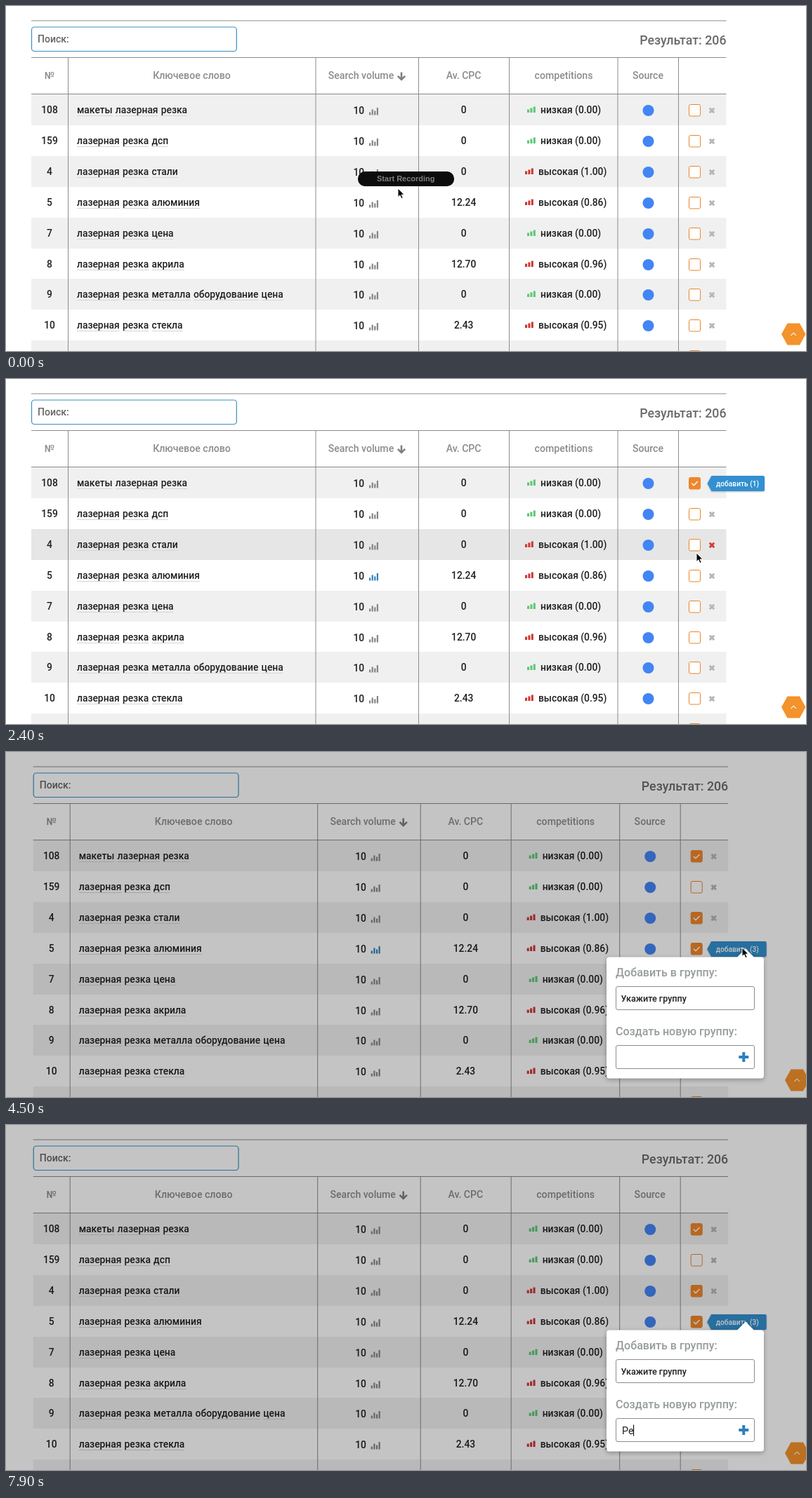
An HTML page that plays this animation: 1139x492 px, repeating every 8 s.

```html
<!DOCTYPE html>
<html lang="ru">
<head>
<meta charset="utf-8">
<title>Ключевые слова</title>
<style>
  html, body { margin: 0; width: 100%; height: 100%; overflow: hidden; background: #fff; }
  svg { display: block; width: 1139px; height: 492px; }
  text { font: 500 13.8px Roboto, "Open Sans", sans-serif; fill: #1f1f1f; white-space: pre; }
  text.head { font-size: 14.1px; fill: #8c8c8c; }
  text.search { font-size: 14px; fill: #666; }
  text.total { font-size: 17.8px; fill: #6a6a6a; }
  text.label { font-size: 16px; fill: #979c9c; }
  text.small { font-size: 12.6px; }
  text.tag { font-size: 10.2px; fill: #fff; }
  text.typed { font-size: 14.3px; font-weight: 400; }
  text.pill { font: bold 11px "Liberation Sans", Arial, sans-serif; fill: #808080; }
  .line { stroke: #8c8c8c; }
  .box { fill: #fff; stroke: #8c8c8c; }
  .check rect { fill: #fff; stroke: #e8862c; }
  .check path { fill: none; stroke: #fff; stroke-width: 1.5; visibility: hidden; }
  .check.on rect { fill: #f0862a; }
  .check.on path { visibility: visible; }
  .cross { fill: none; stroke: #b6b6b6; stroke-width: 3; }
  .hover .cross { stroke: #d63a3a; }
  .hover .bg { fill: #e6e6e6; }
  .bars { fill: #858585; }
  .bars.blue { fill: #2e83b8; }
  #tag { filter: drop-shadow(0 1px 1px rgba(0,0,0,.25)); }
  #popup { filter: drop-shadow(0 2px 3px rgba(0,0,0,.3)); }
</style>
</head>
<body>
<svg viewBox="0 0 1139 492">
  <g id="page">
    <path class="line" d="M36 21H1025.5"/>
    <rect x="36.5" y="30" width="291.8" height="34.5" rx="4" fill="#fff" stroke="#3a8fc4" stroke-width="1.2"/>
    <text class="search" x="45" y="51.5">Поиск:</text>
    <text class="total" x="1025.5" y="54.5" text-anchor="end">Результат: 206</text>
    <g id="rows"></g>
    <g id="grid"></g>
    <path d="M563 94.5V105M557.8 99.8L563 105L568.2 99.8" fill="none" stroke="#808080" stroke-width="2.6"/>
    <g id="tag">
      <path fill="#3390d0"/>
      <text class="tag" y="14.5"></text>
    </g>
  </g>
  <g id="toTop">
    <path d="M1104 468L1112.5 452.5H1130L1138.5 468L1130 483.5H1112.5Z" fill="#f4922b"/>
    <path d="M1117.5 469.8L1121.3 466.2L1125 469.8" fill="none" stroke="#fff" stroke-width="1.1"/>
  </g>
  <rect id="shade" width="1139" height="492"/>
  <g id="popup">
    <path d="M859 292.5H1041L1053 280.5L1065 292.5H1075Q1079 292.5 1079 296.5V461.5Q1079 465.5 1075 465.5H859Q855 465.5 855 461.5V296.5Q855 292.5 859 292.5Z" fill="#fff"/>
    <text class="label" x="868" y="320">Добавить в группу:</text>
    <rect class="box" x="868.5" y="334.5" width="197" height="33" rx="2.5"/>
    <text class="small" x="875.5" y="355.5">Укажите группу</text>
    <text class="label" x="868" y="404">Создать новую группу:</text>
    <rect class="box" x="868.5" y="418.5" width="197" height="33" rx="2.5"/>
    <path d="M1050.3 428V442M1043.3 435H1057.3" stroke="#2b80bd" stroke-width="4"/>
    <text id="typed" class="typed" x="877" y="440.5"></text>
    <path id="caret" d="M0 427.5V443.5" stroke="#111" stroke-width="1.2"/>
  </g>
  <g id="pill">
    <rect x="501" y="236" width="137" height="21" rx="10" fill="#0c0c0c"/>
    <text class="pill" x="569.3" y="249.8" text-anchor="middle">Start Recording</text>
  </g>
  <g id="cursor">
    <circle id="ring" r="25" fill="none" stroke="#0b0b0b" stroke-width="2.5"/>
    <path id="arrow" d="M0 0V12.5L2.9 9.9L5 14.6L7.2 13.6L5.1 9.1H9Z" fill="#000" stroke="#fff"/>
    <g id="hand" fill="#fff" stroke="#000" stroke-width="1.1" stroke-linejoin="round">
      <path d="M-1.3 8V1.2Q0 -.8 1.3 1.2V5.5Q2.8 4.3 3.9 5.8Q5.4 4.8 6.4 6.4Q8.3 5.8 8.7 7.8V11L7.3 15H.2L-3.8 9.8Q-5 7.7 -3.3 7.2Z"/>
      <path d="M1.8 9.5V12.5M4 9.5V12.5M6.2 9.5V12.5" stroke-width=".8"/>
    </g>
    <path id="beam" d="M-3 -6.5Q0 -6.5 0 -4.5Q0 -6.5 3 -6.5M0 -4.5V5M-3 7Q0 7 0 5Q0 7 3 7M-1.5 2.5H1.5" fill="none" stroke="#111" stroke-width="1.2"/>
  </g>
</svg>
<script>
const LOOP = 8000, STEP = 100, OPEN = 4200, TYPE = 7400;
const $ = id => document.getElementById(id);

function add(parent, tag, attrs, text) {
  const el = document.createElementNS('http://www.w3.org/2000/svg', tag);
  for (const k in attrs) el.setAttribute(k, attrs[k]);
  if (text !== undefined) el.textContent = text;
  return parent.appendChild(el);
}
const show = (el, on) => { el.style.display = on ? '' : 'none'; };
const clamp = v => Math.min(1, Math.max(0, v));
const rowTop = i => Math.round(126 + i * 43.9);

// number, keyword, CPC, competition
const data = [
  [108, 'макеты лазерная резка', '0', 0],
  [159, 'лазерная резка дсп', '0', 0],
  [4, 'лазерная резка стали', '0', 1],
  [5, 'лазерная резка алюминия', '12.24', .86],
  [7, 'лазерная резка цена', '0', 0],
  [8, 'лазерная резка акрила', '12.70', .96],
  [9, 'лазерная резка металла оборудование цена', '0', 0],
  [10, 'лазерная резка стекла', '2.43', .95],
  null
];

function bars(parent, x, base, width, gap, heights, attrs) {
  const d = heights.map((h, i) => `M${x + i * gap} ${base}v${-h}h${width}v${h}z`).join('');
  return add(parent, 'path', { d, ...attrs });
}

function keyword(g, phrase) {
  let x = 101;
  for (const word of phrase.split(' ')) {
    const w = add(g, 'text', { x, y: 26.5 }, word).getComputedTextLength();
    add(g, 'path', { d: `M${x} 30.5h${w}`, stroke: '#d6d6d6' });
    x += w + 4.2;
  }
}

const rows = data.map((item, i) => {
  const g = add($('rows'), 'g', { transform: `translate(0 ${rowTop(i)})` });
  add(g, 'rect', { class: 'bg', x: 36, width: 989.5, height: rowTop(i + 1) - rowTop(i), fill: i % 2 ? '#fff' : '#f0f0f0' });
  const check = add(g, 'g', { class: 'check' });
  add(check, 'rect', { x: 972.5, y: 14.5, width: 16, height: 16.5, rx: 2 });
  add(check, 'path', { d: 'M976.3 22.8L979.3 25.8L984.8 20' });
  const row = { g, check };
  if (!item) return row;

  const [num, phrase, cpc, level] = item;
  add(g, 'text', { x: 62, y: 26.5, 'text-anchor': 'middle' }, num);
  keyword(g, phrase);
  add(g, 'text', { x: 494.5, y: 27.5 }, '10');
  row.icon = bars(g, 517, 29.5, 2.2, 3.6, [4, 8, 6, 10.5], { class: 'bars' });
  add(g, 'text', { x: 651.7, y: 26.5, 'text-anchor': 'middle' }, cpc);
  const x = level ? 739 : 742;
  bars(g, x, 26, 3, 4.4, [4.5, 6.5, 8.5], { fill: level ? '#cf3434' : '#5cc872' });
  add(g, 'text', { x: x + 19, y: 26.5 }, `${level ? 'высокая' : 'низкая'} (${level.toFixed(2)})`);
  add(g, 'circle', { cx: 914.5, cy: 23, r: 8, fill: '#4285f4' });
  row.cross = add(g, 'path', { class: 'cross', d: 'M1001.8 19.8L1008.2 26.2M1008.2 19.8L1001.8 26.2' });
  return row;
});

for (const y of [73.5, 125.5]) add($('grid'), 'path', { class: 'line', d: `M36 ${y}H1025.5` });
for (const x of [88.5, 441, 587.5, 716.5, 871, 957.5]) add($('grid'), 'path', { class: 'line', d: `M${x} 73V492` });
[['№', 62], ['Ключевое слово', 264.5], ['Search volume', 505.5], ['Av. CPC', 651.7], ['competitions', 794], ['Source', 914]]
  .forEach(([s, x]) => add($('grid'), 'text', { class: 'head', x, y: 104, 'text-anchor': 'middle' }, s));

// time, x, y
const path = [
  [300, 558, 260], [1100, 981, 147], [1800, 981, 147], [2400, 983, 248], [2650, 981, 237],
  [2950, 981, 237], [3300, 979, 280], [3650, 979, 280], [4100, 1048, 279], [4800, 1048, 279],
  [5400, 942, 431]
];
const clicks = [1500, 2700, 3400, 4100, 5500];
const picks = [[1600, 0], [2800, 2], [3500, 3]];

function cursorAt(t) {
  const n = path.findIndex(p => p[0] > t);
  if (n === 0) return path[0].slice(1);
  if (n < 0) return path[path.length - 1].slice(1);
  const [t0, x0, y0] = path[n - 1], [t1, x1, y1] = path[n];
  const u = (t - t0) / (t1 - t0), e = u * u * (3 - 2 * u);
  return [x0 + (x1 - x0) * e, y0 + (y1 - y0) * e];
}

function drawTag(count, row) {
  show($('tag'), count > 0);
  if (!count) return;
  const tip = [998.5, 996.5, 995.5][count - 1];
  const [shape, label] = $('tag').children;
  $('tag').setAttribute('transform', `translate(0 ${rowTop(row) + 12})`);
  shape.setAttribute('d', `M${tip} 11L${tip + 6} 0H1078Q1080 0 1080 2V20Q1080 22 1078 22H${tip + 6}Z`);
  label.setAttribute('x', tip + 12.5);
  label.textContent = `добавить (${count})`;
}

function render(t) {
  const [x, y] = cursorAt(t), open = t >= OPEN;
  const done = picks.filter(p => t >= p[0]).map(p => p[1]);
  const last = done[done.length - 1];

  rows.forEach((row, i) => {
    const over = t >= 1300 && !open && y >= rowTop(i) && y < rowTop(i + 1);
    row.g.setAttribute('class', over ? 'hover' : '');
    row.check.setAttribute('class', done.includes(i) ? 'check on' : 'check');
    if (row.cross) show(row.cross, i !== last);
  });
  rows[3].icon.setAttribute('class', t >= 2000 && t < 4700 ? 'bars blue' : 'bars');
  drawTag(done.length, last);

  $('page').setAttribute('transform', `translate(${open ? 2.7 : 0} 0)`);
  $('toTop').setAttribute('transform', `translate(${open ? 5 : 0} 0)`);
  const fade = clamp((t - OPEN + 100) / 300);
  $('shade').style.opacity = open ? .23 * fade : 0;
  show($('popup'), open);
  $('popup').style.opacity = fade;

  const text = t >= 7800 ? 'Ре' : t >= 7500 ? 'Р' : '';
  $('typed').textContent = text;
  const end = text ? 877 + $('typed').getComputedTextLength() : 878.3;
  $('caret').setAttribute('transform', `translate(${end} 0)`);
  show($('caret'), t >= TYPE || (t >= 5500 && t % 1000 >= 500));

  $('pill').style.opacity = clamp((600 - t) / 400);

  const inField = open && y > 418;
  const onBox = t > 1200 && !open && rows.some((r, i) => Math.abs(y - rowTop(i) - 22.5) < 9) && x > 971 && x < 990;
  const onTag = !open && t >= 3500 && x > 996;
  const hand = onBox || onTag;
  $('cursor').setAttribute('transform', `translate(${x} ${y})`);
  show($('cursor'), t < TYPE);
  show($('hand'), hand);
  show($('beam'), inField);
  show($('arrow'), !hand && !inField);
  show($('ring'), clicks.some(c => t >= c && t < c + 200));
}

function tick(now) {
  render(Math.floor(now % LOOP / STEP) * STEP);
  requestAnimationFrame(tick);
}
render(0);
requestAnimationFrame(tick);
</script>
</body>
</html>
```
